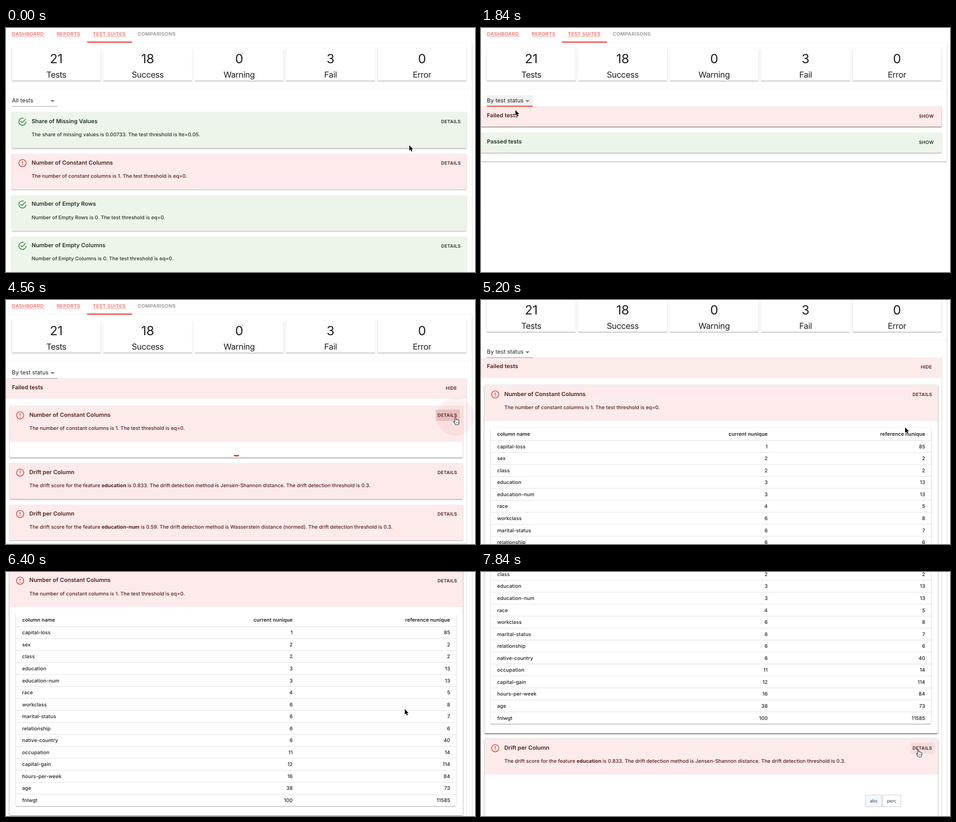
An HTML page with a canvas that plays this animation: 1035 px wide and 541 px high, repeating every 8000 ms.

```html
<!DOCTYPE html>
<html lang="en">
<head>
<meta charset="utf-8">
<title>Test suites</title>
<style>
html, body { margin: 0; width: 100%; height: 100%; overflow: hidden; background: #fff; }
canvas { display: block; width: 100vw; height: 100vh; }
</style>
</head>
<body>
<canvas id="stage" width="1035" height="541"></canvas>
<script>
const ctx = document.getElementById('stage').getContext('2d');
const LOOP = 8000, STEP = 80;
const SANS = 'Inter, sans-serif';
const RED = '#e8140f';
const KINDS = {
  pass: { bg: '#edf4ea', ink: '#1e3522', icon: '#3a8a40' },
  fail: { bg: '#fcebea', ink: '#541c1b', icon: '#d63c3a' }
};

// time, then values; eased between the points
const CURSOR = [
  [320, 890, 260], [1120, 66, 160], [1280, 66, 160], [1520, 76, 182],
  [2000, 76, 182], [2560, 985, 197], [2880, 985, 197], [3280, 880, 290],
  [3840, 880, 290], [4320, 992, 261], [5040, 992, 261], [5360, 880, 304],
  [7120, 880, 304], [7520, 965, 394.5]
];
const SCROLL = [
  [3200, 0], [3440, 4], [3520, 5], [3760, 2], [3920, 2], [4080, 0],
  [5040, 0], [5520, 178], [5680, 196], [5760, 196], [6080, 236.5],
  [6720, 236.5], [6960, 380], [7040, 380], [7280, 419]
];
const SECTION = [[2560, 0], [2880, 1]];
const DETAIL_A = [[4400, 0], [4560, 35.2], [4720, 35.2], [4880, 462.2]];
const DETAIL_B = [[7600, 0], [7760, 35.2], [7840, 400]];

const STATS = [['21', 'Tests'], ['18', 'Success'], ['0', 'Warning'], ['3', 'Fail'], ['0', 'Error']];
const ALL_TESTS = [
  ['pass', 'Share of Missing Values', 'The share of missing values is 0.00733. The test threshold is lte=0.05.', true],
  ['fail', 'Number of Constant Columns', 'The number of constant columns is 1. The test threshold is eq=0.', true],
  ['pass', 'Number of Empty Rows', 'Number of Empty Rows is 0. The test threshold is eq=0.', false],
  ['pass', 'Number of Empty Columns', 'Number of Empty Columns is 0. The test threshold is eq=0.', true]
];
const drift = (name, score, method) =>
  `The drift score for the feature *${name}* is ${score}. The drift detection method is ${method}. The drift detection threshold is 0.3.`;
const FAILED = [
  ['Number of Constant Columns', ALL_TESTS[1][2]],
  ['Drift per Column', drift('education', '0.833', 'Jensen-Shannon distance')],
  ['Drift per Column', drift('education-num', '0.59', 'Wasserstein distance (normed)')]
];
const ROWS = [
  ['capital-loss', 1, 85], ['sex', 2, 2], ['class', 2, 2], ['education', 3, 13],
  ['education-num', 3, 13], ['race', 4, 5], ['workclass', 6, 8], ['marital-status', 6, 7],
  ['relationship', 6, 6], ['native-country', 6, 40], ['occupation', 11, 14],
  ['capital-gain', 12, 114], ['hours-per-week', 16, 84], ['age', 38, 73], ['fnlwgt', 100, 11585]
];

const CHECK = new Path2D('M20 12A8 8 0 0 1 12 20A8 8 0 0 1 4 12A8 8 0 0 1 12 4C12.76 4 13.5 4.11 14.2 4.31L15.77 2.74C14.61 2.26 13.34 2 12 2A10 10 0 0 0 2 12A10 10 0 0 0 12 22A10 10 0 0 0 22 12M7.91 10.08L6.5 11.5L11 16L21 6L19.59 4.58L11 13.17Z');
const ARROW = new Path2D('M0 0V12L2.7 9.5L4.7 14L6.7 13.1L4.8 8.7H8.4Z');
const HAND = new Path2D('M-1.5 6V.5C-1.5-.8 1-.8 1 .5V5L1.3 4.2C2 3.6 3.4 4 3.5 5C4.4 4.4 5.7 4.8 5.8 5.8C6.8 5.4 8 6 8 7V10C8 12 7 13 6.6 15.5H.2C-.5 13.5-3 11.5-4 9.5C-4.6 8.2-3.2 7.4-2.3 8.4L-1.5 9.3Z');

function track(t, keys) {
  if (t <= keys[0][0]) return keys[0].slice(1);
  for (let i = 1; i < keys.length; i++) {
    const a = keys[i - 1], b = keys[i];
    if (t > b[0]) continue;
    const p = (t - a[0]) / (b[0] - a[0]), e = p * p * (3 - 2 * p);
    return a.slice(1).map((v, k) => v + (b[k + 1] - v) * e);
  }
  return keys[keys.length - 1].slice(1);
}

function text(str, x, y, size, { weight = 400, color = '#1f1f1f', align = 'left', spacing = 0, family = SANS } = {}) {
  ctx.font = `${weight} ${size}px ${family}`;
  ctx.letterSpacing = spacing + 'px';
  ctx.textAlign = align;
  ctx.fillStyle = color;
  ctx.fillText(str, x, y);
  return ctx.measureText(str).width;
}

// parts between asterisks are bold
function richText(str, x, y, size, color) {
  str.split('*').forEach((part, i) => {
    x += text(part, x, y, size, { weight: i % 2 ? 700 : 500, color, spacing: 0.03 });
  });
}

function box(x, y, w, h, color) {
  ctx.fillStyle = color;
  ctx.fillRect(x, y, w, h);
}

function paper(x, y, w, h, fill = '#fff', lift = 1) {
  ctx.save();
  ctx.shadowColor = `rgba(0,0,0,${0.14 + 0.14 * lift})`;
  ctx.shadowBlur = 2 + lift;
  ctx.shadowOffsetY = 1.2;
  box(x, y, w, h, fill);
  ctx.restore();
  box(x, y + h - 0.3, w, lift, 'rgba(0,0,0,.26)');
}

function disc(x, y, r, color) {
  ctx.fillStyle = color;
  ctx.beginPath();
  ctx.arc(x, y, r, 0, 7);
  ctx.fill();
}

function ring(x, y, r, color, width, from = 0, to = 2 * Math.PI) {
  ctx.strokeStyle = color;
  ctx.lineWidth = width;
  ctx.beginPath();
  ctx.arc(x, y, r, from, to);
  ctx.stroke();
}

function statusIcon(kind, x, y) {
  const color = KINDS[kind].icon;
  if (kind === 'fail') {
    ring(x, y, 8, color, 1.6);
    box(x - 0.85, y - 4.4, 1.7, 5.3, color);
    box(x - 0.85, y + 2.6, 1.7, 1.8, color);
    return;
  }
  ctx.save();
  ctx.translate(x, y);
  ctx.scale(0.88, 0.88);
  ctx.translate(-12, -12);
  ctx.fillStyle = color;
  ctx.fill(CHECK);
  ctx.restore();
}

function button(label, x, y, w, color, tint) {
  if (tint) box(x - 4, y - 12.5, w + 8, 25, `rgba(95,33,32,${tint})`);
  text(label, x, y + 3.7, 10, { weight: 600, color, spacing: 0.3 });
}

function card(x, y, w, kind, title, desc, { details = true, extra = 0, tint = 0 } = {}) {
  const { bg, ink } = KINDS[kind];
  paper(x, y, w, 79.3 + extra, '#fff', extra > 40 ? 2 : 1);
  box(x, y, w, 79.3, bg);
  statusIcon(kind, x + 23.3, y + 20.7);
  text(title, x + 43.4, y + 23.8, 12.5, { weight: 600, color: ink, spacing: 0.02 });
  richText(desc, x + 43.4, y + 53, 11.06, ink);
  if (details) button('DETAILS', x + w - 55.8, y + 20.7, 45, ink, tint);
}

function bar(y, kind, title, label, open, tint) {
  const { bg, ink } = KINDS[kind];
  if (open) box(0, y, 1016, 45, bg);
  else paper(0, y, 1016, 45, bg);
  text(title, 13, y + 23.5, 12.5, { weight: 600, color: ink });
  const hide = label === 'HIDE';
  button(label, hide ? 970.5 : 966.5, y + 20.8, hide ? 26 : 34, ink, tint);
}

function header() {
  const link = (label, x, w) => {
    text(label, x, 17.3, 10.8, { weight: 600, color: '#f0716c', spacing: 0.3 });
    box(x, 18.6, w, 1, '#f3938f');
  };
  link('DASHBOARD', 13, 73);
  link('REPORTS', 112, 54);
  link('TEST SUITES', 191.5, 74);
  text('COMPARISONS', 290.5, 17.3, 10.8, { weight: 600, color: '#959595', spacing: 0.3 });
  box(179, 30.3, 99, 2, RED);
  STATS.forEach(([count, label], i) => {
    const x = 13 + i * 201.75;
    paper(x, 45, 196, 72);
    text(count, x + 98, 78, 28, { align: 'center' });
    text(label, x + 98, 110, 18.3, { align: 'center', spacing: -0.4 });
  });
  box(0, 134.8, 1028, 1, '#efefef');
}

function picker(label, focused) {
  if (focused) box(13, 149, 102, 25, '#f1f1f1');
  text(label, 13, 165.2, 12.45, { spacing: 0.1 });
  ctx.fillStyle = '#757575';
  ctx.beginPath();
  ctx.moveTo(98, 160);
  ctx.lineTo(107, 160);
  ctx.lineTo(102.5, 164.6);
  ctx.fill();
  if (focused) box(13, 172.6, 101, 1.7, RED);
  else box(13, 173.4, 101, 1, '#8e8e8e');
}

function menu(alpha, hover) {
  ctx.save();
  ctx.globalAlpha = alpha;
  paper(1, 140, 126, 71);
  box(1, hover ? 176 : 147, 126, 29, '#f1f1f1');
  text('All tests', 13, 165.2, 12.45, { spacing: 0.1 });
  text('By test status', 13, 194.5, 12.45, { spacing: 0.1 });
  ctx.restore();
}

function table(top) {
  const pitch = 26.55, line = top + 43.2;
  paper(22, top + 15, 971, 28.2 + pitch * ROWS.length);
  const row = (cells, y, weight) => cells.forEach((cell, i) =>
    text(String(cell), [35.7, 632.7, 980.2][i], y, 11.06, { weight, spacing: 0.08, align: i ? 'right' : 'left' }));
  row(['column name', 'current nunique', 'reference nunique'], line - 10.8, 600);
  ROWS.forEach((cells, i) => {
    const y = line + i * pitch;
    box(22, y - 0.5, 971, 1, '#dedede');
    row(cells, y + 17.3, 500);
  });
}

function spinner(t, start, y) {
  const p = (t - start) / 1400;
  const mid = Math.PI / 2 + p * 6;
  const half = 0.36 + p * 1.6;
  ring(508.5, y, 15, RED, 2.8, mid - half, mid + half);
}

function chartButtons(y) {
  const chip = (x, w, label, fill) => {
    box(x, y, w, 27, fill);
    ctx.strokeStyle = '#c3ccdb';
    ctx.lineWidth = 1;
    ctx.strokeRect(x + 0.5, y + 0.5, w - 1, 26);
    text(label, x + w / 2, y + 17, 9.7, { color: '#2a3f5f', align: 'center', family: '"DejaVu Sans", sans-serif' });
  };
  chip(848, 37, 'abs', '#f4f8fc');
  chip(886, 41, 'perc', '#fff');
}

function failedSection(t, open) {
  const [extraA] = track(t, DETAIL_A), [extraB] = track(t, DETAIL_B);
  const body = (286.5 + extraA + extraB) * open;
  const tintA = t >= 4400 && t < 4720 ? 0.16 : t >= 4240 && t < 5200 ? 0.06 : 0;
  const tintB = t >= 7440 ? 0.06 : 0;
  const yB = 326.8 + extraA, yC = yB + 91.8 + extraB;

  ctx.save();
  ctx.beginPath();
  ctx.rect(0, 170, 1035, 49 + body + 4);
  ctx.clip();
  paper(0, 174, 1016, 45 + body);
  bar(174, 'fail', 'Failed tests', open ? 'HIDE' : 'SHOW', open > 0, t >= 2480 && t < 3040 ? 0.06 : 0);
  if (open) {
    card(8, 235, 1000, 'fail', ...FAILED[0], { extra: extraA, tint: tintA });
    card(8, yB, 1000, 'fail', ...FAILED[1], { extra: extraB, tint: tintB });
    card(8, yC, 1000, 'fail', ...FAILED[2]);
    if (t >= 4800) {
      ctx.save();
      ctx.beginPath();
      ctx.rect(8, 314.3, 1000, extraA);
      ctx.clip();
      table(314.3);
      ctx.restore();
    } else if (t >= 4560) spinner(t, 4560, 330.5);
    if (t >= 7840) chartButtons(yB + 124);
    else if (t >= 7760) spinner(t, 7760, yB + 95.5);
  }
  ctx.restore();
}

function ripple(t, start, x, y) {
  const p = (t - start) / 320;
  if (p <= 0 || p >= 1) return;
  disc(x, y, 42 * Math.min(1, p * 2), `rgba(226,70,62,${p > 0.5 ? 0.18 * (1 - p) : 0.07})`);
}

function pointer(t) {
  const [x, y] = track(t, CURSOR);
  const hand = (t >= 1040 && t < 1600) || (t >= 2480 && t < 3040) || (t >= 4240 && t < 5200) || t >= 7440;
  const shape = hand ? HAND : ARROW;
  ctx.save();
  ctx.translate(x, y);
  ctx.lineJoin = 'round';
  ctx.lineWidth = hand ? 1.1 : 1.6;
  ctx.strokeStyle = hand ? '#2a2a2a' : '#fff';
  ctx.fillStyle = hand ? '#fff' : '#000';
  if (hand) ctx.fill(shape);
  ctx.stroke(shape);
  if (!hand) ctx.fill(shape);
  else for (const k of [1.2, 3.5, 5.7]) box(k, 9, 0.8, 3.5, '#444');
  ctx.restore();
}

function draw(t) {
  const grouped = t >= 1600;
  const [open] = track(t, SECTION);
  const [extraA] = track(t, DETAIL_A), [extraB] = track(t, DETAIL_B);
  const passedY = 232 + (286.5 + extraA + extraB) * open;

  box(0, 0, 1035, 541, '#fff');
  ctx.save();
  ctx.translate(0, -track(t, SCROLL)[0]);
  paper(0, 32, 1028, grouped ? passedY + 32 : 900);
  header();
  if (grouped) {
    failedSection(t, open);
    bar(passedY, 'pass', 'Passed tests', 'SHOW');
  } else {
    ALL_TESTS.forEach(([kind, title, desc, details], i) =>
      card(13, 187 + i * 91.8, 1003, kind, title, desc, { details }));
  }
  picker(grouped ? 'By test status' : 'All tests', t >= 1120 && t < 2640);
  const fade = track(t, [[1120, 0], [1280, 1], [1520, 1], [1760, 0]])[0];
  if (fade) menu(fade, t >= 1440);
  ripple(t, 2560, 985, 197);
  ripple(t, 4400, 992, 259);
  ripple(t, 7520, 964, 812);
  ctx.restore();
  pointer(t);
}

function tick(now) {
  ctx.textRendering = 'geometricPrecision';
  const t = now % LOOP;
  draw(t - t % STEP);
  requestAnimationFrame(tick);
}
requestAnimationFrame(tick);
</script>
</body>
</html>
```
